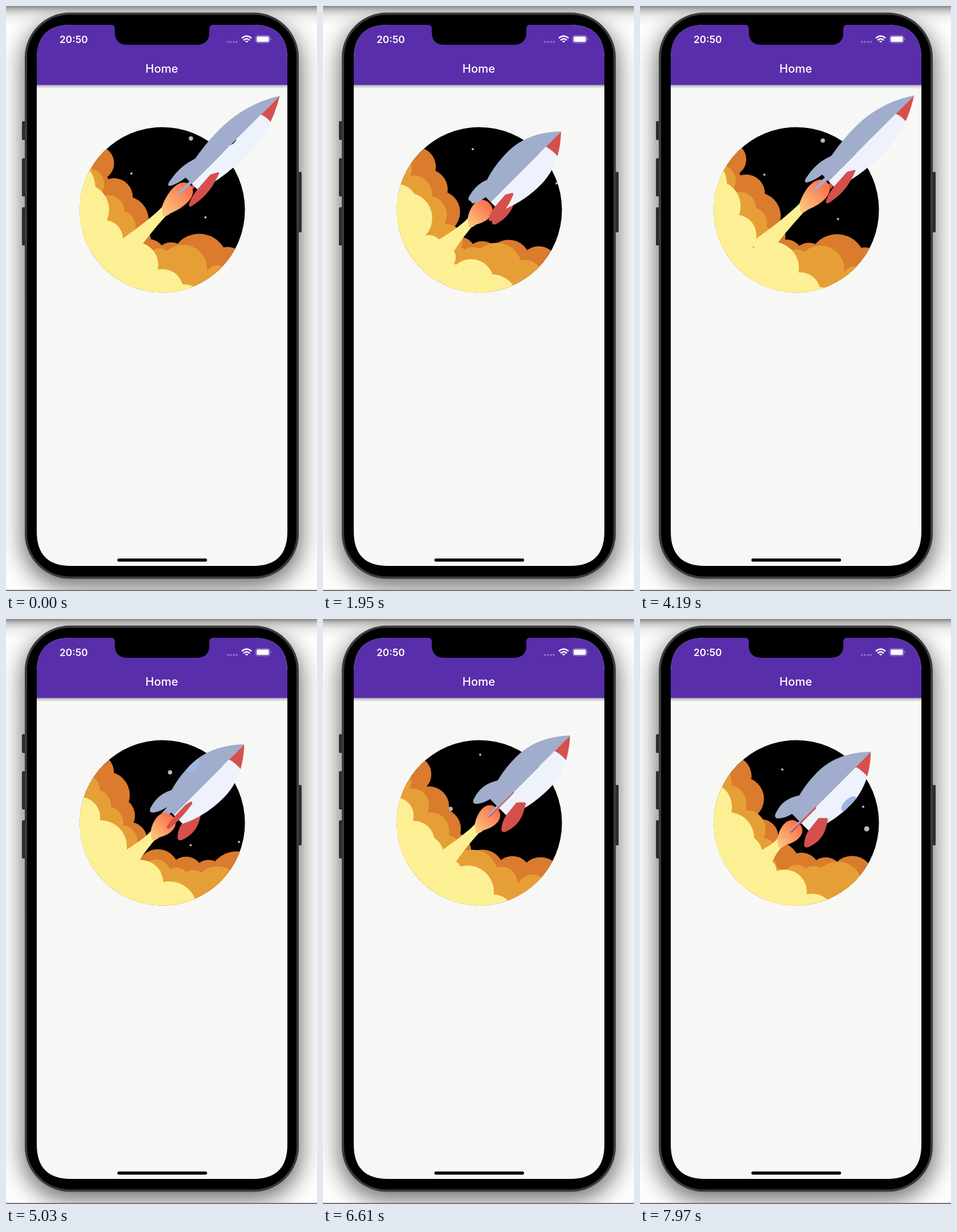
An HTML page that plays this animation: 546 px wide and 1026 px high, repeating every 7.99 s.

```html
<!DOCTYPE html>
<html lang="en">
<head>
<meta charset="utf-8">
<title>Home</title>
<style>
  html, body { margin: 0; width: 100%; height: 100%; overflow: hidden; background: #fdfdfc; }
  svg { display: block; width: 100vw; height: 100vh; }
  text { font-family: Inter, Roboto, sans-serif; fill: #fff; }
</style>
</head>
<body>
<svg viewBox="0 0 546 1026" xmlns="http://www.w3.org/2000/svg">
  <defs>
    <filter id="blur" x="-20%" y="-20%" width="140%" height="140%"><feGaussianBlur stdDeviation="20"/></filter>
    <linearGradient id="topShade" x2="0" y2="1">
      <stop stop-color="#858585"/><stop offset=".2" stop-color="#aaa" stop-opacity=".7"/>
      <stop offset=".5" stop-color="#ccc" stop-opacity=".35"/><stop offset="1" stop-color="#ddd" stop-opacity="0"/>
    </linearGradient>
    <linearGradient id="barShade" x2="0" y2="1">
      <stop stop-color="#000" stop-opacity=".3"/><stop offset="1" stop-color="#000" stop-opacity="0"/>
    </linearGradient>
    <linearGradient id="heat" x1="1" x2="0">
      <stop offset=".1" stop-color="#fb7550"/><stop offset=".9" stop-color="#fcc27b"/>
    </linearGradient>
    <linearGradient id="paint" gradientUnits="userSpaceOnUse" x1="0" y1="-60" x2="0" y2="60">
      <stop offset=".5" stop-color="#a0adcd"/><stop offset=".5" stop-color="#d5504d"/>
    </linearGradient>
    <clipPath id="screen"><path d="M54 93Q54 33 114 33H434Q494 33 494 93V922Q494 982 434 982H114Q54 982 54 922Z"/></clipPath>
    <clipPath id="space"><circle cx="274.5" cy="357.5" r="145"/></clipPath>
    <clipPath id="lower"><path id="half" d="M0 0C-20 19-50 41-92 41C-125 41-155 33-175 22V0Z"/></clipPath>
    <clipPath id="upper"><use href="#half" transform="scale(1 -1)"/></clipPath>
  </defs>

  <rect width="546" height="1026" fill="#fdfdfc"/>
  <rect x="30" y="24" width="487" height="994" rx="80" fill="#000" opacity=".58" filter="url(#blur)"/>
  <rect width="546" height="36" fill="url(#topShade)"/>
  <rect y="1024" width="546" height="2" fill="#77757c"/>

  <g fill="#2c2c31">
    <rect x="28" y="202" width="8" height="33" rx="2"/>
    <rect x="28" y="267" width="8" height="67" rx="2"/>
    <rect x="28" y="353" width="8" height="67" rx="2"/>
    <rect x="511" y="291" width="8" height="106" rx="2"/>
  </g>
  <rect x="35" y="13.500" width="477" height="989" rx="77" fill="#000" stroke="#3b3b3c" stroke-width="4"/>

  <g clip-path="url(#screen)">
    <rect x="54" y="33" width="440" height="950" fill="#f7f7f5"/>
    <rect x="54" y="138" width="440" height="7" fill="url(#barShade)"/>
    <rect x="54" y="33" width="440" height="105.500" fill="#592eab"/>
  </g>
  <path d="M185 33Q191 33 191 40V46Q191 68 214 68H334Q357 68 357 46V40Q357 33 363 33Z"/>
  <text x="94" y="64.500" font-size="17.300" font-weight="600">20:50</text>
  <text x="273.500" y="117" font-size="20.300" font-weight="500" text-anchor="middle">Home</text>
  <g fill="#fff" fill-opacity=".35">
    <circle cx="389.500" cy="63" r="1.800"/><circle cx="394.500" cy="63" r="1.800"/>
    <circle cx="400" cy="63" r="1.800"/><circle cx="405" cy="63" r="1.800"/>
  </g>
  <g fill="none" stroke="#fff" stroke-width="2.500">
    <path d="M414 56.500Q422.500 49 431 56.500M417 60Q422.500 55 428 60"/>
    <path d="M420.200 61.600H424.800L422.500 64Z" stroke-width="1" fill="#fff"/>
  </g>
  <rect x="438.500" y="52" width="24.500" height="12.500" rx="3.500" fill="none" stroke="#fff" stroke-opacity=".5"/>
  <rect x="440" y="53.500" width="21.500" height="9.500" rx="2.200" fill="#fff"/>
  <path d="M464.500 56.500Q467 58.200 464.500 60Z" fill="#fff" fill-opacity=".5"/>
  <rect x="195.500" y="969" width="157.500" height="5.500" rx="2.700"/>

  <circle cx="274.500" cy="357.500" r="145"/>
  <g clip-path="url(#space)">
    <g id="stars" fill="#b9b9b9"></g>
    <g id="smoke"></g>
  </g>
  <g transform="rotate(-45) translate(0 451)">
    <path id="plume" fill="#fdf094"/>
    <g id="rocket">
      <g class="fins"><path id="backFins" fill="url(#paint)" stroke="url(#paint)" stroke-width="5" stroke-linejoin="round"/></g>
      <g id="body">
        <use href="#half" fill="#edf2fc"/>
        <path d="M5-1H-38Q-33 14-36 34H5Z" fill="#d5504d" clip-path="url(#lower)"/>
        <g clip-path="url(#lower)"><g id="port">
          <ellipse fill="#9fb4e3"/><ellipse fill="#fff"/><ellipse fill="#1b2430"/>
        </g></g>
        <use href="#half" transform="scale(1 -1)" fill="#a0adcd"/>
        <g clip-path="url(#upper)"><ellipse id="rim" cx="-90" fill="#9fb6e8"/></g>
      </g>
      <path id="flame" fill="url(#heat)"/>
      <g class="fins"><path id="frontFins" fill="url(#paint)" stroke="url(#paint)" stroke-width="5" stroke-linejoin="round"/></g>
    </g>
  </g>
</svg>

<script>
const NS = 'http://www.w3.org/2000/svg';
const LOOP = 7990, CYCLE = 115;
const $ = id => document.getElementById(id);
const mod = (a, b) => ((a % b) + b) % b;
const clamp = (v, lo = 0, hi = 1) => Math.min(hi, Math.max(lo, v));

function add(parent, tag, attrs) {
  const el = parent.appendChild(document.createElementNS(NS, tag));
  set(el, attrs);
  return el;
}
function set(el, attrs) {
  for (const key in attrs) el.setAttribute(key, attrs[key]);
}

// Each bank drifts along y + slope * (x - 260).
// Puffs: [step at which the puff passes x = 260, radius].
const layers = [
  { fill: '#da7b2d', speed: 3.3,
    right: { y: 440, slope: .12, puffs: [[22, 50], [37, 29], [49, 30], [64, 37], [79, 33], [95, 38], [109, 30], [7, 33]] },
    left: { y: 427, slope: .5, puffs: [[15, 30], [33, 33], [45, 41], [56, 32], [69, 32], [86, 35], [98, 36], [110, 38]] } },
  { fill: '#e69f36', speed: 3,
    right: { y: 448, slope: .25, puffs: [[29, 42], [43, 25], [53, 22], [65, 27], [83, 27], [100, 44], [114, 26], [9, 21]] },
    left: { y: 445, slope: .72, puffs: [[11, 34], [24, 27], [40, 28], [49, 28], [59, 28], [70, 29], [84, 30], [99, 33], [111, 33]] } },
  { fill: '#fdf094', speed: 3,
    right: { y: 484, slope: .9, puffs: [[57, 48], [41, 36], [74, 40], [88, 36], [103, 46], [115, 40], [16, 39], [29, 42]] },
    left: { y: 487, slope: .72, puffs: [[39, 45], [56, 36], [73, 46], [90, 32], [105, 36], [113, 45], [16, 45], [26, 49]] } }
];
const puffs = [];
for (const { fill, speed, ...banks } of layers) {
  for (const side in banks) {
    const { y, slope, puffs: list } = banks[side];
    const g = add($('smoke'), 'g', { fill });
    // The left bank is mirrored across the flight axis.
    if (side === 'left') g.setAttribute('transform', 'matrix(0 -1 -1 0 638 638)');
    add(g, 'path', { d: `M200 425L245 ${y - 15 * slope - 6}L440 ${y + 180 * slope - 6}V700H100V525Z` });
    for (const [at, r] of list) puffs.push({ el: add(g, 'circle', {}), speed, y, slope, at, r });
  }
}

// Stars: step, x, y, speed, radius.
const stars = [
  [15, 249, 265, .93, 2], [30, 371, 350, 1.3, 2], [29, 356, 410, 2.8, 4.6],
  [48, 321, 236, 1.83, 3.8], [66, 409, 391, 1.3, 2]
].map(([at, x, y, v, r]) => ({ el: add($('stars'), 'circle', { r }), at, x, y, v }));

const noseKeys = [[0, 140], [14, 122], [30, 72], [47, 230], [68, 138], [99, 163]];
const stretchKeys = [[0, 1], [14, 1], [30, .79], [43, 1.27], [60, 1], [98, 1.02]];

// Periodic monotone cubic through the keys.
function curve(keys, n) {
  const len = keys.length;
  const key = i => [keys[mod(i, len)][0] + CYCLE * Math.floor(i / len), keys[mod(i, len)][1]];
  const rise = i => (key(i + 1)[1] - key(i)[1]) / (key(i + 1)[0] - key(i)[0]);
  const slope = i => {
    const a = rise(i - 1), b = rise(i);
    return a * b > 0 ? 2 * a * b / (a + b) : 0;
  };
  let i = len - 1;
  while (i > 0 && keys[i][0] > n) i--;
  const [x0, y0] = key(i), [x1, y1] = key(i + 1);
  const w = x1 - x0, p = (n - x0) / w, q = 1 - p;
  return y0 * (1 + 2 * p) * q * q + y1 * p * p * (3 - 2 * p) + w * p * q * (slope(i) * q - slope(i + 1) * p);
}

// Three steps every 140 ms: two short, one long.
const steps = t => 3 * Math.floor(t / 140) + Math.min(2, Math.floor(mod(t, 140) / 20));

function stepAt(t) {
  if (t < 1060) return 45 + steps(Math.min(t, 260) + 20);
  return mod(steps(Math.max(0, t - 1110)) - 18, CYCLE);
}

function finPath(angle) {
  const k = -Math.sin(angle) * (1 - .2 * Math.cos(angle));
  const p = (x, y) => `${x} ${(y * k).toFixed(2)} `;
  return `M${p(-139, 29)}C${p(-155, 40)}${p(-170, 47)}${p(-191, 40)}Q${p(-200, 38)}${p(-196, 34)}Q${p(-188, 26)}${p(-174, 23)}L${p(-148, 20)}Z`;
}

function drawSky(n) {
  for (const s of stars) {
    const d = s.v * (mod(n - s.at + CYCLE / 2, CYCLE) - CYCLE / 2);
    set(s.el, { cx: s.x - d, cy: s.y + d });
  }
  for (const { el, speed, y, slope, at, r } of puffs) {
    const d = speed * (mod(n - at + 30, CYCLE) - 30);
    set(el, { cx: 260 + d, cy: y + slope * d, r: r * clamp((d + 75) / 50) });
  }
}

function drawPort(angle, wide) {
  const y = -38 * Math.sin(angle), c = Math.cos(angle);
  const inner = clamp((c - .2) / .7);
  const [blue, white, glass] = $('port').children;
  set($('port'), { visibility: c > -.1 ? 'visible' : 'hidden' });
  set(blue, { cx: -92, cy: y - 3 * inner, rx: 17 * wide, ry: 18 * Math.max(c, .45) });
  set(white, { cx: -91, cy: y, rx: 16.5 * wide, ry: 17 * inner });
  set(glass, { cx: -92, cy: y + 1, rx: 13.5 * wide, ry: 13.5 * inner });
  set($('rim'), { cy: y, rx: 15, ry: 8, visibility: y < -32 && c > -.1 ? 'visible' : 'hidden' });
}

function drawRocket(n) {
  const nose = curve(noseKeys, n), s = curve(stretchKeys, n);
  const turn = (n - 14) / CYCLE * 2 * Math.PI;
  const long = Math.max(1, s);
  set($('rocket'), { transform: `translate(${nose} 0)` });
  set($('body'), { transform: `scale(${s} ${1 / long})` });
  for (const g of document.querySelectorAll('.fins'))
    set(g, { transform: `scale(${s} ${long ** -1.5})` });

  let front = '', back = '';
  for (let i = 0; i < 4; i++) {
    const a = turn + i * Math.PI / 2;
    if (Math.cos(a) < -.05) back += finPath(a);
    else front += finPath(a);
  }
  set($('frontFins'), { d: front });
  set($('backFins'), { d: back });
  drawPort(turn - 82 * Math.PI / 180, 1 / s);

  const head = -178 * s, size = 55 * s ** 1.2, tail = head - size;
  set($('flame'), { d: `M${head} 0C${head} -20 ${head - size * .4} -24 ${tail + 9} -8L${tail} 4Q${tail + 3} 10 ${tail + 12} 10C${head - size * .4} 23 ${head} 20 ${head} 0Z` });
  const end = nose + tail, mid = (end - 145) / 2;
  set($('plume'), { d: `M-155 -20Q${mid} -10 ${end} -8L${end + size * .5} -8V8L${end} 8Q${mid} 10 -147 17L-165 20Z` });
}

function draw(t) {
  const n = stepAt(t);
  drawSky(n);
  drawRocket(n);
}

const start = performance.now();
function tick() {
  draw((performance.now() - start) % LOOP);
  requestAnimationFrame(tick);
}
tick();
</script>
</body>
</html>
```
